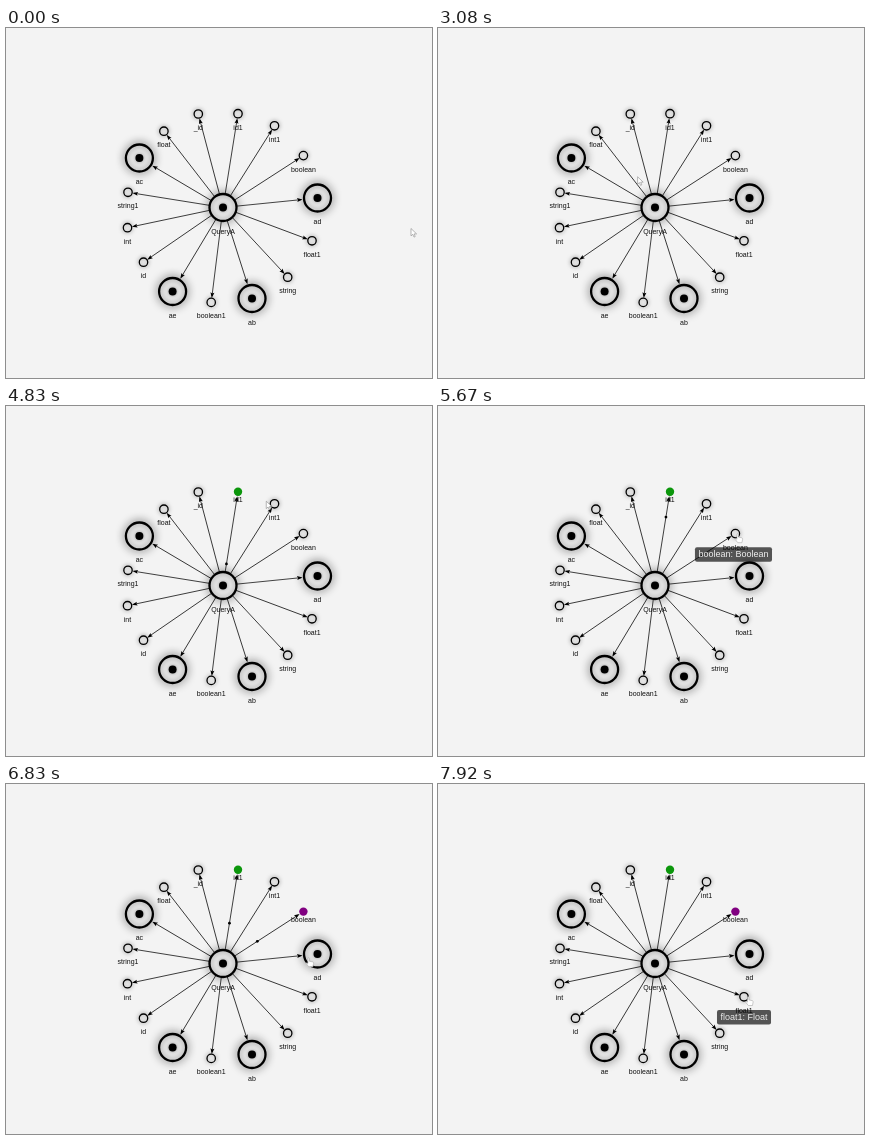
An HTML page with a canvas for the animation above (8000 ms loop, 426x350 px).

```html
<!DOCTYPE html>
<html lang="en">
<head>
<meta charset="utf-8">
<title>Query graph</title>
<style>
  html, body { margin: 0; width: 100%; height: 100%; overflow: hidden; background: #f3f3f3; }
  canvas { display: block; width: 426px; height: 350px; }
</style>
</head>
<body>
<canvas id="stage"></canvas>
<script>
const LOOP = 8000, STEP = 1000 / 12, TRAVEL = 1667;
const FONT = '"Liberation Sans", Arial, sans-serif';
const canvas = document.getElementById('stage');
const ctx = canvas.getContext('2d');
const scale = window.devicePixelRatio || 1;
canvas.width = 426 * scale;
canvas.height = 350 * scale;

const root = { name: 'QueryA', x: 217, y: 179.5, big: true };
const leaf = (name, x, y, extra) => ({ name, x, y, ...extra });
const leaves = [
  leaf('_id', 192.3, 86),
  leaf('id1', 232, 85.7, { color: '#0b960b', picked: 4330, flowFrom: 4450 }),
  leaf('int1', 268.5, 97.8),
  leaf('boolean', 297.4, 127.6, { color: '#800080', picked: 6250, flowFrom: 6122 }),
  leaf('ad', 311.5, 170, { big: true }),
  leaf('float1', 306, 212.8),
  leaf('string', 281.7, 249.2),
  leaf('ab', 246, 270.5, { big: true }),
  leaf('boolean1', 205.2, 274.4),
  leaf('ae', 166.6, 263.5, { big: true }),
  leaf('id', 137.5, 234.2),
  leaf('int', 121.5, 199.7),
  leaf('string1', 122, 164.3),
  leaf('ac', 133.4, 130, { big: true }),
  leaf('float', 157.9, 103.2),
];

// Pointer legs: each is a run of [time, x, y]; the pointer is hidden between legs.
const legs = [
  [[0, 405, 200.5], [80, 405, 200.5]],
  [[830, 9.5, 81.5], [1170, 9.5, 81.5]],
  [[2000, 93.8, 44.7], [2080, 95.5, 75.5], [2330, 95.5, 75.5], [2420, 97, 72.5],
   [2580, 112, 130], [2830, 160, 213], [3000, 192, 175], [3170, 207.5, 121.5],
   [3330, 248, 106], [3500, 287, 97], [3670, 262, 92], [3830, 236, 87],
   [3920, 234, 86.5], [4670, 234, 86.5], [4830, 260, 95], [5080, 280, 110],
   [5330, 293, 123], [5500, 298, 127], [5670, 299, 127.7], [5830, 300.5, 131],
   [6330, 300.5, 131], [6420, 301, 132], [6580, 312, 152], [6830, 302, 173.5],
   [7000, 298, 188], [7170, 301, 198], [7420, 306, 207], [7750, 309.5, 212.5],
   [LOOP, 309.5, 212.5]],
];
const hands = [[3830, 4750], [4750, 4830], [5500, 6500], [6750, 6920], [7660, LOOP]];
const tips = [
  [3830, 4170, 'id1: ID!'], [4750, 4830, 'id1: ID!'],
  [5580, 6000, 'boolean: Boolean'], [6420, 6500, 'boolean: Boolean'],
  [7750, LOOP, 'float1: Float'],
];
const during = (spans, t) => spans.find(([from, to]) => t >= from - 4 && t < to - 4);

function disc(x, y, r, fill) {
  ctx.beginPath();
  ctx.arc(x, y, r, 0, 2 * Math.PI);
  ctx.fillStyle = fill;
  ctx.fill();
}

function glow(blur, alpha) {
  ctx.shadowBlur = blur * scale;
  ctx.shadowColor = `rgba(0,0,0,${alpha})`;
}

function write(text, x, y, size, color) {
  ctx.font = `${size}px ${FONT}`;
  ctx.textAlign = 'center';
  ctx.textBaseline = 'alphabetic';
  ctx.fillStyle = color;
  ctx.fillText(text, x, y + size * 0.34);
}

function drawLink(node) {
  const dx = node.x - root.x, dy = node.y - root.y;
  const length = Math.hypot(dx, dy);
  const tip = length - (node.big ? 15 : 4.5);
  ctx.save();
  ctx.translate(root.x, root.y);
  ctx.rotate(Math.atan2(dy, dx));
  ctx.beginPath();
  ctx.moveTo(0, 0);
  ctx.lineTo(tip - 2, 0);
  ctx.lineWidth = 0.75;
  ctx.strokeStyle = '#111';
  ctx.stroke();
  ctx.beginPath();
  ctx.moveTo(tip, 0);
  ctx.lineTo(tip - 5.5, -2);
  ctx.lineTo(tip - 4.5, 0);
  ctx.lineTo(tip - 5.5, 2);
  ctx.fillStyle = '#000';
  ctx.fill();
  ctx.restore();
}

function drawParticle(node, t) {
  if (!node.color || t < node.picked - 4) return;
  const k = ((t - node.flowFrom) / TRAVEL) % 1;
  disc(root.x + (node.x - root.x) * k, root.y + (node.y - root.y) * k, 1.4, '#000');
}

function drawNode(node, t) {
  const { x, y, big } = node;
  const picked = node.color && t >= node.picked - 4;
  if (picked) {
    disc(x, y, 4.2, node.color);
  } else {
    const r = big ? 13.5 : 4.2;
    ctx.save();
    disc(x, y, r, '#fff');
    glow(big ? 8 : 4, big ? 0.9 : 0.6);
    ctx.beginPath();
    ctx.arc(x, y, r, 0, 2 * Math.PI);
    ctx.lineWidth = big ? 2.3 : 1.3;
    ctx.strokeStyle = '#000';
    ctx.stroke();
    if (big) {
      glow(4, 0.5);
      disc(x, y, 4, '#000');
    }
    ctx.restore();
  }
  write(node.name, x, y + (big ? 24 : picked ? 7.7 : 13.6), 7, '#111');
}

function drawTip(text, x, y) {
  ctx.font = `9px ${FONT}`;
  const width = ctx.measureText(text).width + 7;
  ctx.beginPath();
  ctx.roundRect(x - 3.5 - width / 2, y + 13.5, width, 14.5, 2);
  ctx.fillStyle = 'rgba(0,0,0,0.65)';
  ctx.fill();
  write(text, x - 3.5, y + 20.7, 9, '#eee');
}

const arrowShape = new Path2D('M0 0V7.4L1.8 5.8 3 8.6 4.2 8 3.1 5.4H5.6Z');
const handShape = new Path2D(
  'M0 .6Q.7-.4 1.4 .6V3.4L5 4.2Q5.8 4.5 5.6 5.6L5 9H.8L-1.8 5.6Q-1.6 4.4 0 5.6Z');

function drawPointer(x, y, hand) {
  const shape = hand ? handShape : arrowShape;
  ctx.save();
  ctx.translate(x, y);
  ctx.fillStyle = '#fff';
  ctx.fill(shape);
  ctx.lineWidth = 0.6;
  ctx.strokeStyle = hand ? '#aaa' : '#888';
  ctx.stroke(shape);
  ctx.restore();
}

function pointerAt(t) {
  const leg = legs.find(l => t >= l[0][0] - 4 && t < l[l.length - 1][0] - 4);
  if (!leg) return null;
  const i = Math.max(1, leg.findIndex(p => p[0] > t));
  const [t0, x0, y0] = leg[i - 1], [t1, x1, y1] = leg[i];
  const k = Math.max(0, (t - t0) / (t1 - t0));
  return [x0 + (x1 - x0) * k, y0 + (y1 - y0) * k];
}

function draw(now) {
  const t = Math.floor(((now % LOOP) + 4) / STEP) * STEP % LOOP;
  ctx.setTransform(scale, 0, 0, scale, 0, 0);
  ctx.fillStyle = '#f3f3f3';
  ctx.fillRect(0, 0, 426, 350);
  leaves.forEach(drawLink);
  leaves.forEach(node => drawParticle(node, t));
  [root, ...leaves].forEach(node => drawNode(node, t));

  const pointer = pointerAt(t);
  if (pointer) {
    const tip = during(tips, t);
    if (tip) drawTip(tip[2], ...pointer);
    drawPointer(...pointer, during(hands, t));
  }
}

const start = performance.now();
function tick() {
  draw(performance.now() - start);
  requestAnimationFrame(tick);
}
tick();
</script>
</body>
</html>
```
